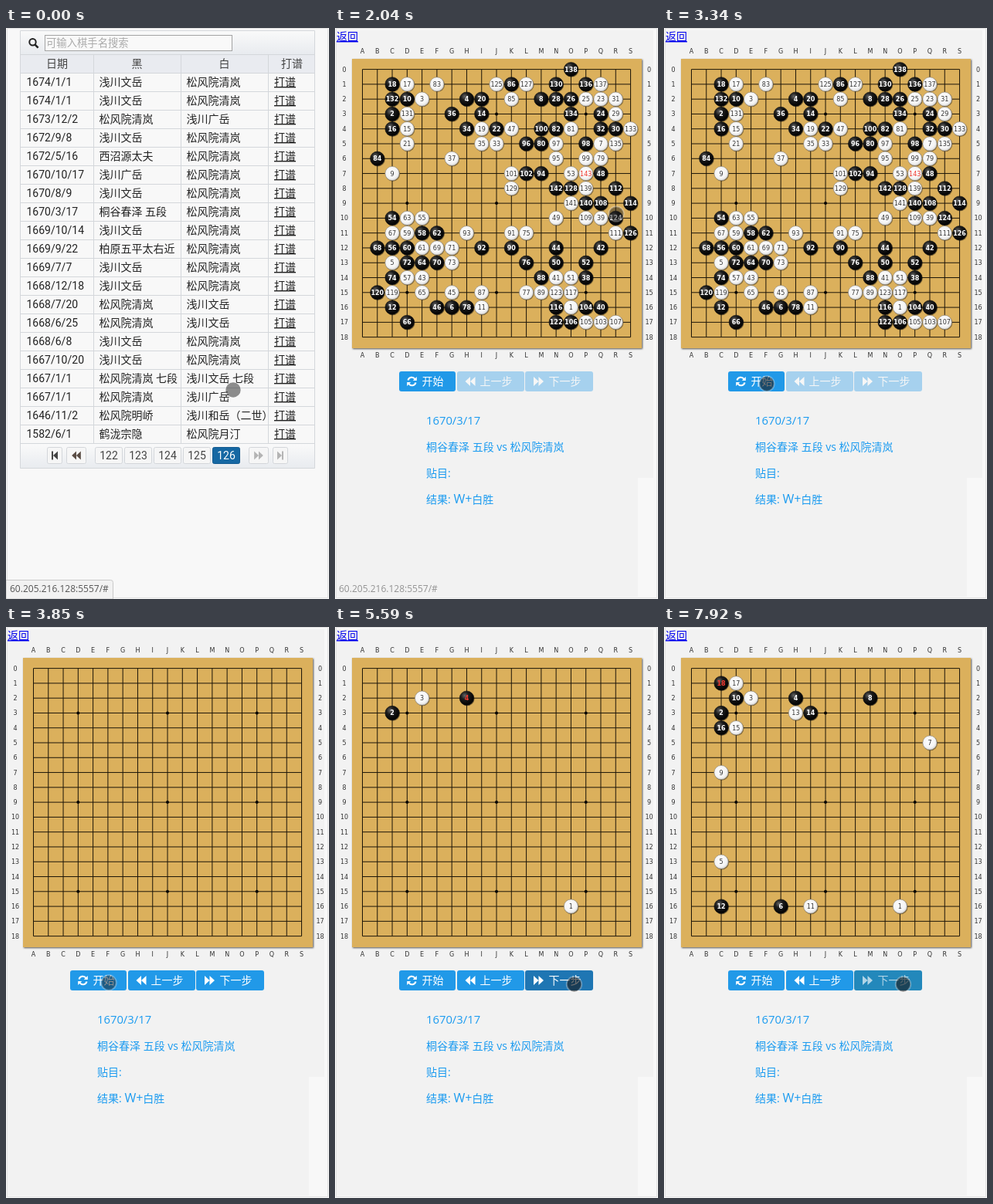
An HTML page for the animation above (8000 ms loop, 418x740 px).

```html
<!DOCTYPE html>
<html lang="zh-CN">
<head>
<meta charset="utf-8">
<style>
html, body { margin: 0; width: 100%; height: 100%; overflow: hidden; background: #f8f8f8; }
svg { display: block; width: 100%; height: 100%; }
text { font: 14px Roboto, "Noto Sans CJK SC", "Noto Sans CJK", sans-serif; fill: #222; white-space: pre; }
.mid { text-anchor: middle; }
.link { text-decoration: underline; }
.head, .page { fill: #444; }
.hint { font-size: 13.33px; fill: #aaa; }
.status { font: 12px "Open Sans", sans-serif; fill: #555; }
.info { font-family: "Open Sans", "Noto Sans CJK SC", "Noto Sans CJK", sans-serif; fill: #1b9bf0; }
.tag, .stone text { font: 8px "DejaVu Sans", sans-serif; text-anchor: middle; fill: #333; }
.stone.black text { font-weight: bold; fill: #fff; }
.stone.last text { fill: #f03a30; }
.label { fill: #fff; }
</style>
</head>
<body>
<svg id="stage" viewBox="0 0 418 740">
  <defs>
    <linearGradient id="bar" x2="0" y2="1"><stop stop-color="#fafafa"/><stop offset="1" stop-color="#e8ebef"/></linearGradient>
    <radialGradient id="black" cx=".36" cy=".32" r=".6"><stop stop-color="#666"/><stop offset=".45" stop-color="#1c1c1c"/><stop offset="1" stop-color="#060606"/></radialGradient>
    <radialGradient id="white" cx=".45" cy=".42" r=".6"><stop stop-color="#fff"/><stop offset=".7" stop-color="#f4f4f4"/><stop offset="1" stop-color="#d2d2d2"/></radialGradient>
    <clipPath id="cells"><path d="M18 0H339V571H18z"/></clipPath>
    <filter id="shade"><feDropShadow dx="1" dy="1" stdDeviation="1" flood-opacity=".65"/></filter>
  </defs>
  <path d="M1.5 .5H416.5V738.5H1.5z" fill="#f8f8f8" stroke="#e2e2e2"/>
  <g id="list"></g>
  <g id="game"></g>
  <g id="status"></g>
  <circle id="cursor" r="9.7"/>
</svg>
<script>
const $ = id => document.getElementById(id);
const text = (x, y, s, cls = '', extra = '') => `<text x="${x}" y="${y}" class="${cls}" ${extra}>${s}</text>`;
const rect = (x, y, w, h, fill, extra = '') => `<rect x="${x}" y="${y}" width="${w}" height="${h}" fill="${fill}" ${extra}/>`;
const range = n => [...Array(n).keys()];

// Icons, centred on x, y
const double = (x, y, dir, fill, s = 1) =>
  `<path transform="translate(${x} ${y}) scale(${dir * s} ${s})" fill="${fill}" d="M-6.5-6L0 0-6.5 6zM0-6L6.5 0 0 6z"/>`;
const toEnd = (x, y, dir, fill) =>
  `<path transform="translate(${x} ${y}) scale(${dir} 1)" fill="${fill}" d="M-4-5.5L2 0-4 5.5zM2-5.5h2v11h-2z"/>`;
const refresh = (x, y) => `<g transform="translate(${x} ${y})" fill="none" stroke="#fff" stroke-width="2.1">
  <path d="M-5-1.5A5 5 0 0 1 4-3M5 1.5A5 5 0 0 1-4 3"/>
  <path d="M6.3-6v5h-5zM-6.3 6v-5h5z" fill="#fff" stroke="none"/></g>`;

// Game list
const A = '浅川文岳', B = '松风院清岚', C = '浅川广岳', D = '桐谷春泽 五段';
const games = [
  ['1674/1/1', A, B], ['1674/1/1', A, B], ['1673/12/2', B, C], ['1672/9/8', A, B],
  ['1672/5/16', '西沼源太夫', B], ['1670/10/17', C, B], ['1670/8/9', A, B], ['1670/3/17', D, B],
  ['1669/10/14', A, B], ['1669/9/22', '柏原五平太右近', B], ['1669/7/7', A, B], ['1668/12/18', A, B],
  ['1668/7/20', B, A], ['1668/6/25', B, A], ['1668/6/8', A, B], ['1667/10/20', A, B],
  ['1667/1/1', B + ' 七段', A + ' 七段'], ['1667/1/1', B, C],
  ['1646/11/2', '松风院明峤', '浅川和岳（二世）'], ['1582/6/1', '鹤泷宗隐', '松风院月汀']
];

function pager() {
  const box = (x, w, on) => rect(x + .5, 543.5, w - 1, 21, on ? '#1668a3' : '#f6f6f6',
    `rx="2" stroke="${on ? '#125a90' : '#d3d6da'}"`);
  return box(53, 20) + toEnd(63, 554, -1, '#444') + box(78, 26) + double(91, 554, -1, '#5a4d45', .9) +
    range(5).map(i => box(115 + 38 * i, 36, i === 4) +
      text(133 + 38 * i, 559, 122 + i, 'mid page', i === 4 ? 'style="fill:#fff"' : '')).join('') +
    box(314, 26) + double(327, 554, 1, '#b4b4b4', .9) + box(345, 20) + toEnd(355, 554, 1, '#b4b4b4');
}

$('list').innerHTML =
  rect(18, 3, 382, 31, 'url(#bar)') + rect(18, 34, 382, 24, '#e9ebf0') + rect(18, 538, 382, 33, 'url(#bar)') +
  `<path fill="none" stroke="#d4d7db" d="M18.5 3.5H399.5V570.5H18.5z${range(22).map(i => `M18 ${34.5 + 24 * i}H400`).join('')}
    M113.5 34V538M226.5 34V538M339.5 34V538"/>` +
  '<path d="M37.6 21.6l4 4" stroke="#222" stroke-width="2.6"/><circle cx="34.5" cy="18.3" r="4.2" fill="none" stroke="#222" stroke-width="2"/>' +
  rect(50.5, 9.5, 242, 20, '#f9f9f9', 'stroke="#a3a3a3"') + text(52, 24, '可输入棋手名搜索', 'hint') +
  [[66, '日期'], [169.5, '黑'], [282.5, '白'], [370, '打谱']].map(([x, s]) => text(x, 51, s, 'mid head')).join('') +
  '<g clip-path="url(#cells)">' +
  games.map((g, i) => [26.5, 120.5, 233.5].map((x, k) => text(x, 75 + 24 * i, g[k])).join('')).join('') + '</g>' +
  games.map((g, i) => text(347, 75 + 24 * i, '打谱', 'link')).join('') + pager();

// Board: one entry per row, each stone is a column letter and its move number
const LAST = 143, CAPTURED = 13;
const record = `O138
C18 D17 F83 J125 K86 L127 N130 P136 Q137
C132 D10 E3 H4 I20 K85 M8 N28 O26 P25 Q23 R31
H13 C2 D131 G36 I14 O134 Q24 R29
C16 D15 H34 I19 J22 K47 M100 N82 O81 Q32 R30 S133
D21 I35 J33 L96 M80 N97 P98 Q7 R135
B84 G37 N95 P99 Q79
C9 K101 L102 M94 O53 P143 Q48
K129 N142 O128 P139 R112
O141 P140 Q108 S114
C54 D63 E55 N49 P109 Q39 R124
C67 D59 E58 F62 H93 K91 L75 R111 S126
B68 C56 D60 E61 F69 G71 I92 K90 N44 Q42
C5 D72 E64 F70 G73 L76 N50 P52
C74 D57 E43 M88 N41 O51 P38
B120 C119 E65 G45 I87 L77 M89 N123 O117
C12 F46 G6 H78 I11 N116 O1 P104 Q40
D66 N122 O106 P105 Q103 R107`;
const px = c => 35.5 + 19.28 * c, py = r => 53.6 + 19.28 * r;
const letter = i => String.fromCharCode(65 + i);

const stones = record.split('\n').map((row, r) => row.split(' ').map(s => {
  const n = +s.slice(1), color = n % 2 ? 'white' : 'black';
  return `<g class="stone ${color}" data-n="${n}" transform="translate(${px(s.charCodeAt(0) - 65)} ${py(r)})">
    <circle cx=".7" cy=".8" r="9.4" fill="#000" opacity=".4"/>
    <circle r="9.2" fill="url(#${color})" stroke="${n % 2 ? '#8a8275' : '#111'}" stroke-width=".6"/>
    <text y="3">${n}</text></g>`;
}).join('')).join('');

const button = (id, x, w, icon, s, tx) =>
  `<g id="${id}">${rect(x, 445, w, 26, '#2199e8', 'rx="3"')}<g>${icon}${text(tx, 463, s, 'label')}</g></g>`;

$('game').innerHTML =
  '<path d="M2 3H412V583H392V737H2z" fill="#f2f2f2"/>' +
  text(2, 16, '返回', 'link', 'style="fill:#00e"') +
  rect(22, 40, 375, 375, '#dbb05c', 'filter="url(#shade)"') +
  `<path stroke="#1c1508" d="${range(19).map(i => `M${px(i)} 53.6V400.6M35.5 ${py(i)}H382.5`).join('')}"/>` +
  [3, 9, 15].map(c => [3, 9, 15].map(r => `<circle cx="${px(c)}" cy="${py(r)}" r="2"/>`).join('')).join('') +
  range(19).map(i => [30, 424].map(y => text(px(i), y + 3, letter(i), 'tag')).join('') +
    [12, 406.5].map(x => text(x, py(i) + 3, i, 'tag')).join('')).join('') +
  stones +
  button('start', 83, 73, refresh(99.5, 458), '开始', 112.5) +
  button('prev', 158, 87, double(175, 458, -1, '#fff'), '上一步', 187.5) +
  button('next', 246, 88, double(263.5, 458, 1, '#fff'), '下一步', 276.5) +
  text(118, 514, '1670/3/17', 'info', 'style="font-size:14.8px"') +
  text(118, 548, D + ' vs ' + B, 'info') +
  text(118, 582, '贴目:', 'info') +
  text(118, 616, '结果: <tspan font-size="16">W+</tspan>白胜', 'info');

$('status').innerHTML =
  '<path id="bubble" d="M0 715.5H135.5a3 3 0 0 1 3 3V740H0z" fill="#f2f2f2" stroke="#c9c9c9"/>' +
  text(5, 731, '60.205.216.128:5557/#', 'status');

// Timeline in ms
const LOOP = 8000, OPEN = 2040, RESET = 3730;
const path = [
  [0, 294, 469], [150, 294, 469], [438, 352, 372], [726, 383, 270], [870, 364, 240], [1700, 364, 238],
  [OPEN, 364, 241], [2160, 364, 243], [2350, 364, 243], [2700, 240, 380], [3030, 133, 461],
  [3750, 133, 461], [4320, 309.5, 463], [LOOP, 309.5, 463]
];
const presses = [[1180, 1330], [1740, OPEN], [3190, RESET]];
const moveTime = n => n < 2 ? 4450 : n <= 6 ? 4810 + (n - 2) * 265 : 5870 + (n - 6) * 170;
const moves = range(18).map(i => i + 1);
const stoneNodes = [...document.querySelectorAll('.stone')];
const show = (node, on) => { node.style.display = on ? '' : 'none'; };
let shown = -1;

function cursorAt(t) {
  const time = t < 150 ? 0 : 150 + Math.floor((t - 150) / 144) * 144;
  const i = path.findIndex(p => p[0] > time);
  const [t0, x0, y0] = path[i - 1], [t1, x1, y1] = path[i];
  const k = (time - t0) / (t1 - t0);
  return [x0 + (x1 - x0) * k, y0 + (y1 - y0) * k];
}

function setStones(count) {
  if (count === shown) return;
  shown = count;
  for (const node of stoneNodes) {
    const n = +node.dataset.n;
    show(node, n <= count && !(count === LAST && n === CAPTURED));
    node.classList.toggle('last', n === count);
  }
}

function render(t) {
  const playing = t >= OPEN, replay = t >= RESET;
  const count = moves.filter(n => t >= moveTime(n)).length;
  const [x, y] = cursorAt(t);
  show($('list'), !playing);
  show($('game'), playing);
  show($('bubble'), !playing);
  $('status').style.opacity = !playing ? 1 : t < 2340 ? .6 : t < 2480 ? .25 : 0;

  setStones(replay ? count : LAST);
  for (const id of ['prev', 'next']) $(id).style.opacity = replay ? 1 : .36;

  const from = moveTime(count);
  const held = count > 0 && t > from + (moveTime(count + 1) - from) * .62;
  const hover = replay && x > 246;
  $('next').firstChild.setAttribute('fill', !hover ? '#2199e8' : held ? '#1f76b3' : '#2388bb');
  $('next').lastChild.style.opacity = hover && !held ? .65 : 1;

  const down = presses.some(([a, b]) => t >= a && t < b) || count > 0;
  const cursor = $('cursor');
  cursor.setAttribute('transform', `translate(${x} ${y})`);
  cursor.setAttribute('fill', `rgba(22,22,22,${down ? .6 : .48})`);
  cursor.setAttribute('stroke', playing ? 'rgba(255,255,255,.3)' : 'none');
  cursor.setAttribute('stroke-width', 2);
}

const begin = performance.now();
function tick() {
  render((performance.now() - begin) % LOOP);
  requestAnimationFrame(tick);
}
tick();
</script>
</body>
</html>
```
